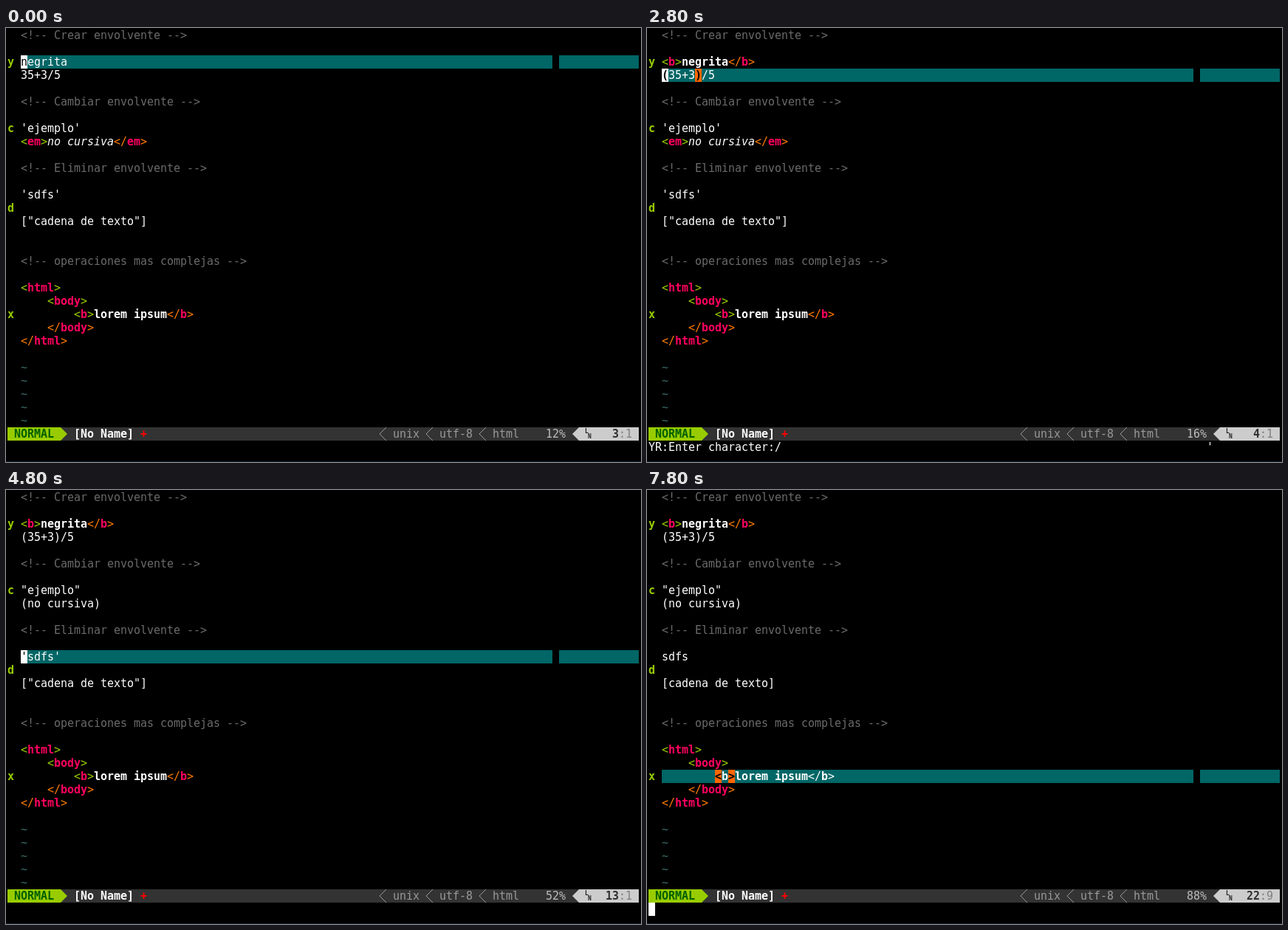
Recreate the animation shown at these times as an HTML page with a canvas. Size 860 by 588 pixels, loop 8 s.

```html
<!DOCTYPE html>
<html lang="es">
<head>
<meta charset="utf-8">
<title>Envolventes</title>
<style>
  html, body { margin: 0; width: 100%; height: 100%; overflow: hidden; background: #000; }
  canvas { display: block; }
</style>
</head>
<body>
<canvas id="screen" width="860" height="588"></canvas>
<script>
const LOOP = 8000;
const CELL_W = 9, CELL_H = 18, LEFT = 2, TOP = 1, BASELINE = 14;
const GUTTER = 2, COLUMNS = 95, RULER = 82, STATUS_ROW = 30, COMMAND_ROW = 31, SHOWCMD_COL = 84;
const TOTAL_LINES = 25;
const C = {
  text: '#fff', comment: '#6a6a6a', name: '#ff005f', open: '#99cc00', close: '#ff7a00',
  line: '#006666', match: '#ff6600', tilde: '#3a6a6a', bar: '#333', light: '#ccc', dim: '#999'
};
const SIGNS = { 2: 'y', 7: 'c', 13: 'd', 21: 'x' };
const BUFFER = {
  0: '<!-- Crear envolvente -->',
  2: 'negrita',
  3: '35+3/5',
  5: '<!-- Cambiar envolvente -->',
  7: "'ejemplo'",
  8: '<em>no cursiva</em>',
  10: '<!-- Eliminar envolvente -->',
  12: "'sdfs'",
  14: '["cadena de texto"]',
  17: '<!-- operaciones mas complejas -->',
  19: '<html>',
  20: '    <body>',
  21: '        <b>lorem ipsum</b>',
  22: '    </body>',
  23: '</html>'
};
const ASK = 'YR:Enter character:';

// prompt: cursor column on the command line, or null while it is in the text.
// edit: new content of the current row.
const STEPS = [
  { at: 0, row: 2, col: 0, cmd: '', show: '', prompt: null },
  { at: 300, show: 'ys' },
  { at: 400, show: 'yss', prompt: 0 },
  { at: 900, cmd: '<b', prompt: 2 },
  { at: 1000, cmd: '<b>', show: '', prompt: null, edit: '<b>negrita</b>' },
  { at: 1300, row: 3 },
  { at: 1700, show: 'y' },
  { at: 1800, show: 'ys' },
  { at: 2000, show: 'yst', cmd: ASK, prompt: ASK.length },
  { at: 2100, show: 'yst/', cmd: ASK + '/', prompt: 0 },
  { at: 2400, show: '', prompt: null, edit: '(35+3)/5' },
  { at: 2800, show: "'" },
  { at: 2900, show: '', row: 7 },
  { at: 3100, show: 'c' },
  { at: 3200, show: '', prompt: 0 },
  { at: 3400, cmd: '', prompt: null, edit: '"ejemplo"' },
  { at: 3600, row: 8 },
  { at: 3800, prompt: 0 },
  { at: 4300, prompt: null, edit: '(no cursiva)' },
  { at: 4700, show: "'" },
  { at: 4800, show: '', row: 12 },
  { at: 5400, prompt: 0 },
  { at: 5500, prompt: null, edit: 'sdfs' },
  { at: 5700, row: 14 },
  { at: 5800, col: 2 },
  { at: 6000, col: 1 },
  { at: 6100, show: 'd' },
  { at: 6200, show: '', prompt: 0 },
  { at: 6400, prompt: null, edit: '[cadena de texto]' },
  { at: 7000, show: '2' },
  { at: 7100, show: '22' },
  { at: 7300, show: '', row: 21 },
  { at: 7400, col: 8 },
  { at: 7800, prompt: 0 }
];

const states = [];
STEPS.reduce((prev, { edit, ...patch }) => {
  const state = { ...prev, ...patch };
  if (edit) state.lines = { ...prev.lines, [state.row]: edit };
  states.push(state);
  return state;
}, { lines: BUFFER });

const ctx = document.getElementById('screen').getContext('2d');
const x = col => LEFT + col * CELL_W;
const y = row => TOP + row * CELL_H;

function fill(col, row, count, color) {
  ctx.fillStyle = color;
  ctx.fillRect(x(col), y(row), count * CELL_W, CELL_H);
}

function write(text, col, row, color, style = '') {
  ctx.font = `${style} 15px "DejaVu Sans Mono", monospace`;
  ctx.fillStyle = color;
  [...text].forEach((ch, i) => {
    if (ch !== ' ') ctx.fillText(ch, x(col + i), y(row) + BASELINE);
  });
}

function invert(ch, col, row, background, style) {
  fill(col, row, 1, background);
  write(ch, col, row, '#000', style);
}

// Splits a line into coloured runs.
function highlight(line) {
  if (line.startsWith('<!--')) return [[line, C.comment]];
  const runs = [];
  let style = '';
  for (const part of line.split(/(<\/?\w+>)/)) {
    const tag = part.match(/^(<\/?)(\w+)(>)$/);
    if (!tag) {
      runs.push([part, C.text, style]);
      continue;
    }
    const [, start, name, end] = tag;
    const closing = start === '</';
    const edge = closing ? C.close : C.open;
    runs.push([start, edge], [name, C.name, 'bold'], [end, edge]);
    style = closing ? '' : { b: 'bold', em: 'italic' }[name] || '';
  }
  return runs;
}

function drawLine(line, row, current) {
  let col = GUTTER;
  for (const [text, color, style] of highlight(line)) {
    write(text, col, row, current ? C.text : color, style);
    col += text.length;
  }
}

function drawCursor({ lines, row, col, cmd, prompt }) {
  const line = lines[row], ch = line[col];
  const closer = { '(': ')', '[': ']', '<': '>' }[ch];
  const style = closer ? 'bold' : '';
  if (closer) {
    invert(ch, GUTTER + col, row, C.match, style);
    invert(closer, GUTTER + line.indexOf(closer, col), row, C.match, style);
  }
  if (prompt === null) invert(ch, GUTTER + col, row, '#fff', style);
  else invert(cmd[prompt] || ' ', prompt, COMMAND_ROW, '#fff');
}

// Triangle or chevron one cell wide; dir is 1 for right, -1 for left.
function arrow(col, dir, color, outline) {
  const base = x(dir > 0 ? col : col + 1), top = y(STATUS_ROW);
  ctx.beginPath();
  ctx.moveTo(base, top);
  ctx.lineTo(base + dir * CELL_W, top + CELL_H / 2);
  ctx.lineTo(base, top + CELL_H);
  ctx.fillStyle = ctx.strokeStyle = color;
  ctx.lineWidth = 1;
  if (outline) ctx.stroke();
  else ctx.fill();
}

function drawStatus({ row, col }) {
  const put = (text, at, color, style) => write(text, at, STATUS_ROW, color, style);
  fill(0, STATUS_ROW, COLUMNS, C.bar);
  fill(0, STATUS_ROW, 8, C.open);
  arrow(8, 1, C.open);
  put('NORMAL', 1, '#005f00', 'bold');
  put('[No Name]', 10, '#fff', 'bold');
  put('+', 20, '#f00', 'bold');
  for (const [text, at] of [['unix', 58], ['utf-8', 65], ['html', 73]]) {
    arrow(at - 2, -1, C.dim, true);
    put(text, at, C.dim);
  }
  const number = row + 1;
  put(`${number / TOTAL_LINES * 100}%`.padStart(4), 80, '#bcbcbc');
  arrow(85, -1, C.light);
  fill(86, STATUS_ROW, 9, C.light);
  ctx.font = 'bold 8px "DejaVu Sans Mono", monospace';
  ctx.fillStyle = '#222';
  ctx.fillText('L', x(87) - 1, y(STATUS_ROW) + 8);
  ctx.fillText('N', x(87) + 3, y(STATUS_ROW) + 15);
  put(String(number).padStart(2), 90, '#303030', 'bold');
  put(`:${col + 1}`, 92, '#808080');
}

function draw(state) {
  ctx.fillStyle = '#000';
  ctx.fillRect(0, 0, 860, 588);
  ctx.fillStyle = '#0b1f2e';
  ctx.fillRect(0, 587, 860, 1);
  fill(GUTTER, state.row, COLUMNS - GUTTER, C.line);
  fill(RULER, state.row, 1, '#000');
  for (const row in SIGNS) write(SIGNS[row], 0, +row, C.open, 'bold');
  for (const row in state.lines) drawLine(state.lines[row], +row, +row === state.row);
  for (let row = TOTAL_LINES; row < STATUS_ROW; row++) write('~', GUTTER, row, C.tilde);
  drawStatus(state);
  write(state.cmd, 0, COMMAND_ROW, C.text);
  write(state.show, SHOWCMD_COL, COMMAND_ROW, C.text);
  drawCursor(state);
}

let shown;
const start = performance.now();
function tick() {
  const time = (performance.now() - start) % LOOP;
  const state = states.findLast(s => s.at <= time);
  if (state !== shown) draw(shown = state);
  requestAnimationFrame(tick);
}
tick();
</script>
</body>
</html>
```
